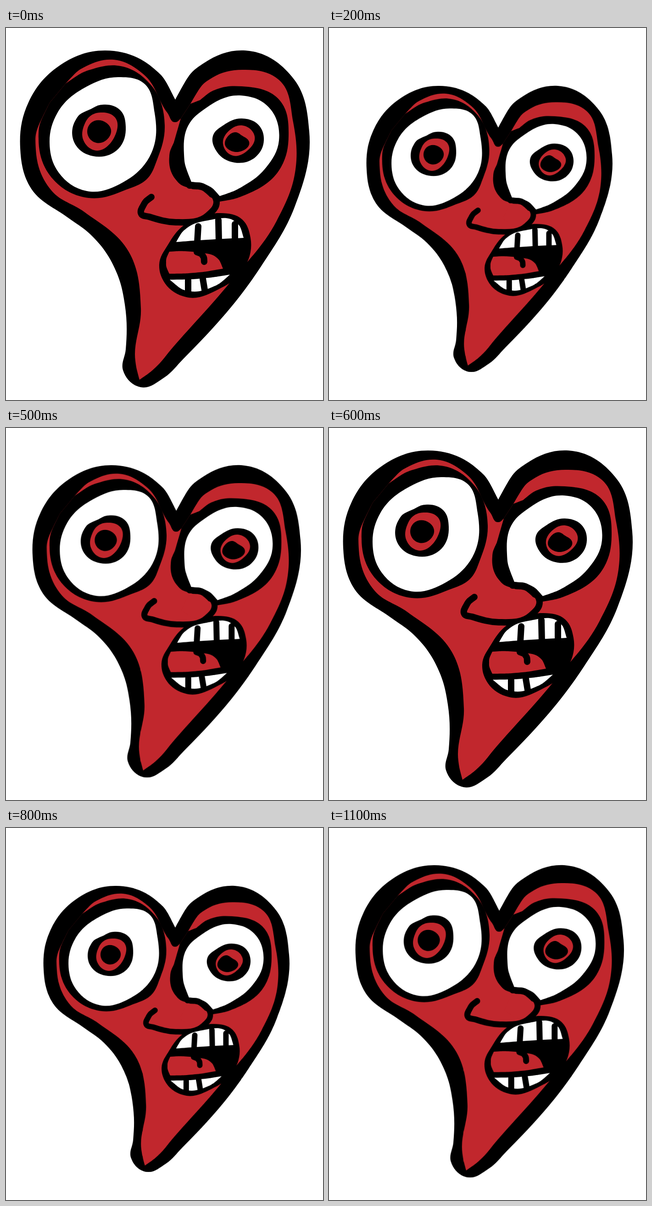
Recreate the animation shown at these times as an HTML page. Size 691x810 px, loop 1.2 s.

```html
<!DOCTYPE html>
<html lang="en">
<head>
<meta charset="utf-8">
<title>Beating heart face</title>
<style>
  html, body { margin: 0; width: 100%; height: 100%; overflow: hidden; background: #fff; }
  svg { display: block; width: 691px; height: 810px; }
  .red { fill: #c1272d; }
  .white { fill: #fff; }
  .line { fill: none; stroke: #000; stroke-width: 14; stroke-linecap: round; stroke-linejoin: round; }
  #heart { transform-origin: 0 0; animation: beat 600ms step-end infinite; }

  /* Shrinks in hard steps, then grows back */
  @keyframes beat {
    0%, 100% { transform: none; }
    16.66%, 83.33% { transform: translate(29.2px, 35.6px) scale(.927); }
    33.33%, 66.66% { transform: translate(55.5px, 84.3px) scale(.8495); }
    50% { transform: translate(82px, 129px) scale(.773); }
  }
</style>
</head>
<body>
<svg viewBox="0 0 691 810"><g id="heart"></g></svg>
<script>
  const heart = document.getElementById('heart');

  // Smooth curve through "x,y" points; a trailing "!" makes a corner.
  function curve(text, open) {
    const pts = text.split(' ').map(s => {
      const [x, y] = s.split(',').map(parseFloat);
      return { x, y, corner: s.endsWith('!') };
    });
    const n = pts.length;
    const at = i => pts[(i + n) % n];
    const gap = (a, b) => Math.hypot(b.x - a.x, b.y - a.y);

    pts.forEach((p, i) => {
      if (p.corner || (open && (i === 0 || i === n - 1))) return;
      const a = at(i - 1), b = at(i + 1), before = gap(a, p), after = gap(p, b);
      const x = (p.x - a.x) / before * after + (b.x - p.x) / after * before;
      const y = (p.y - a.y) / before * after + (b.y - p.y) / after * before;
      const size = Math.hypot(x, y);
      p.dir = { x: x / size, y: y / size };
    });

    const handle = (p, reach) => p.dir && { x: p.x + p.dir.x * reach, y: p.y + p.dir.y * reach };
    let d = `M${pts[0].x} ${pts[0].y}`;
    for (let i = 0; i < (open ? n - 1 : n); i++) {
      const p = at(i), q = at(i + 1), reach = gap(p, q) * .36;
      const out = handle(p, reach), into = handle(q, -reach);
      const c1 = out || into || p, c2 = into || out || q;
      d += `C${c1.x} ${c1.y} ${c2.x} ${c2.y} ${q.x} ${q.y}`;
    }
    return d;
  }

  function draw(kind, text) {
    const path = document.createElementNS('http://www.w3.org/2000/svg', 'path');
    path.setAttribute('class', kind);
    path.setAttribute('d', curve(text, kind === 'line'));
    heart.append(path);
  }

  // Body
  draw('black', '369,156! 322,88 217,49 115,83 49,162 31,262 52,345 138,415 178,444 243,537 259,602 261,700 255,745 293,782 345,761 386,721 556,519 629,390 661,225 628,112 522,49 432,76');
  draw('red', '291,766! 282,725 294,610 268,488 170,400 100,355 65,265 95,163! 130,121! 175,83 235,69 300,101 352,185 368,205 381,197! 402,165! 450,108 515,91 595,113 626,205 630,315 590,420 490,552 364,695 325,740');

  // Left eye
  draw('black', '130,121! 190,89 250,83 315,123 346,212 330,285 308,328 262,352 180,370 105,332 71,240 95,163!');
  draw('white', '245,107 300,120 324,185 317,272 255,336 176,355 115,315 95,250 112,185 175,128');
  draw('black', '186,176! 210,167 250,180 261,215 245,263 190,279 152,255 152,200');
  draw('red', '186,190 206,184 237,194 236,238 192,266 169,245 171,210');
  draw('black', '186,206 218,206 229,222 222,241 197,250 178,232');

  // Right eye
  draw('black', '402,165! 423,157! 460,133 514,127 597,158 616,235 600,302 515,366 466,378! 410,352! 370,330 356,280 366,249! 381,197!');
  draw('white', '404,335! 388,275 401,206 432,177 513,147 568,168 595,245 565,306 514,346 466,366! 440,343');
  draw('black', '514,197 553,214 562,245 545,280 498,293 460,270 451,235 475,211');
  draw('red', '514,212 542,236 525,268 495,278 473,252 488,222');
  draw('black', '482,238 501,227 514,234 530,248 503,270 477,251');

  // Nose
  draw('red', '400,351! 436,360 450,381 414,410! 380,390!');
  draw('line', '400,343 435,349 459,380 440,408 370,423 312,411 295,405 300,385 317,368');

  // Mouth
  draw('black', '468,403 515,417 533,457 512,533 465,568 393,586 344,552 334,515 353,472 387,430 430,409');
  draw('white', '371,466! 395,435 440,419 500,422 518,457! 440,461');
  draw('line', '419,432 417,466');
  draw('line', '463,418 464,466');
  draw('line', '499,427 499,460');
  draw('red', '356,487! 390,486 420,489 458,499 473,524! 410,533 356,535! 349,510');
  draw('line', '416,488 429,496 432,509');
  draw('white', '357,548! 430,545 488,537! 450,564 400,573');
  draw('line', '397,548 397,574');
  draw('line', '429,546 433,570');
</script>
</body>
</html>
```
